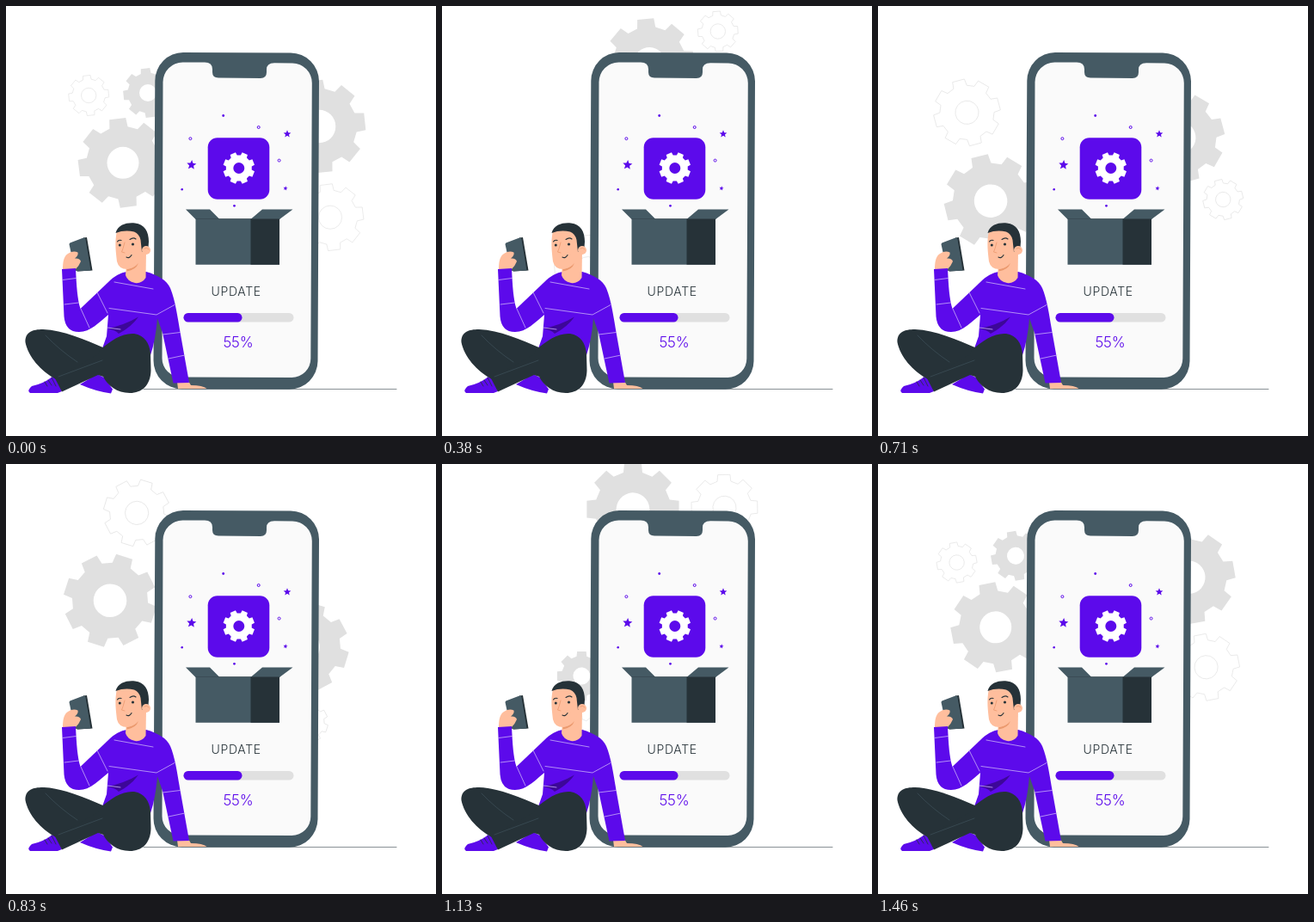
These frames come from a looping animation (500x500 px, 1.5 s). An HTML page:

```html
<!DOCTYPE html>
<html lang="en">
<head>
<meta charset="utf-8">
<title>Update</title>
<style>
  html, body { margin: 0; width: 100%; height: 100%; overflow: hidden; background: #fff; }
  svg { display: block; width: 100vw; height: 100vh; }
  text { font-family: Inter, sans-serif; font-weight: 300; text-anchor: middle; }
  .purple { fill: #5c0aeb; }
  .slate { fill: #455a64; }
  .dark { fill: #263238; }
  .skin { fill: #ffbe9d; }
  .light { fill: #e0e0e0; }
  .line { fill: none; stroke-linecap: round; stroke-linejoin: round; }
</style>
</head>
<body>
<svg viewBox="0 0 500 500">
  <g id="gears"></g>

  <path class="line" d="M160 445.500H454" stroke="#6b757a" stroke-width=".8"/>

  <g id="phone">
    <path class="slate" d="M206 54L331 54.600A33 33 0 0 1 364 87.600L362.500 413A33 33 0 0 1 329.500 445.700L204.500 445.400A33 33 0 0 1 171.500 412L173.300 87A33 33 0 0 1 206 54Z"/>
    <path fill="#fafafa" d="M205.500 65.600H231Q240 65.600 240 73.600V77Q240 83.500 247 83.500L296 84Q303 84 303 77V74Q303 66.300 312 66.300L333 66.500A23 23 0 0 1 355.800 89.500L354.300 410A22 22 0 0 1 332.300 432L203.500 431.500A22 22 0 0 1 181.500 409.500L182.500 88.600A23 23 0 0 1 205.500 65.600Z"/>
  </g>

  <g id="confetti" class="purple">
    <circle cx="252.700" cy="127.500" r="1.400"/>
    <circle cx="204.700" cy="213.300" r="1.300"/>
    <circle cx="265.500" cy="232.300" r="1.400"/>
    <g fill="none" stroke="#5c0aeb">
      <circle cx="293.700" cy="141" r="1.500"/>
      <circle cx="214.400" cy="154.200" r="1.500"/>
      <circle cx="317.600" cy="179.600" r="1.500"/>
    </g>
  </g>

  <rect class="purple" x="234.700" y="153.300" width="71.600" height="71.400" rx="11"/>
  <g id="icon"></g>

  <g id="box">
    <path class="slate" d="M209 236.500H237L248 247.500H285L298 236.500H333.500L318 248V300.700H220.500V248Z"/>
    <path class="dark" d="M284.500 247.500H318V300.700H284.500Z"/>
    <path class="line" d="M221 247.500H318" stroke="#37474f" stroke-width=".7"/>
  </g>

  <text class="dark" x="267.700" y="337.300" font-size="14" letter-spacing=".7">UPDATE</text>
  <rect class="light" x="206.500" y="357" width="128" height="10.400" rx="5.200"/>
  <rect class="purple" x="206.500" y="357" width="68" height="10.400" rx="5.200"/>
  <text class="purple" x="269.900" y="397" font-size="17" letter-spacing="-.2">55%</text>

  <g id="person">
    <!-- hands and device -->
    <path class="skin" d="M199 437L212 436L215 441Q229 441 233.500 445H200Z"/>
    <path class="dark" d="M90 269.500L94 269L100.500 307.500L83 308.500Z"/>
    <path class="slate" d="M73.500 277Q73.500 275.500 75.500 275L90 269.500Q92 269 92.500 271L98.500 307.500L83 308.500Q80 308 79.500 305Z"/>
    <path class="skin" d="M66 307C66 298 67 291 72 288Q78 284 83.500 286.500Q84.500 290 80 293.500Q86 293 87 297Q85 302 81 306Z"/>

    <!-- feet -->
    <path class="purple" d="M54 431L60 434L65 448L60 450H28Q24 447 30 442Q44 439 54 431Z"/>
    <path class="purple" d="M86 440L106 428L114 432L124 445.500L122 450.500Q104 448 86 440Z"/>
    <path class="line" d="M53 432L58 442M49 435L53 441M45 437L48 442" stroke="#263238" stroke-width=".8"/>

    <!-- sweater -->
    <path class="purple" d="M65 306L81 305C82 326 83 341 86.500 352L119 321C126 314 133 310 141 309H163C177 313 187 319 191 328C197 342 200 365 203 382L213 438L194.500 438.500L182 380L176 363Q174 388 168 406L112 398L117 384L119 359C108 368 98 379 85 379Q69 379 67.500 361Z"/>
    <path fill="#3d0799" d="M118 375Q138 371 154 361.500Q146 373 131 381Q128 377 118 375Z"/>
    <path class="line" stroke="#c9b0f8" stroke-width=".8" d="M66 318.500L81.500 316.500M68 347L84.500 345M87 352L97 374M106 333L118 357M126 321L171 329M120 351.500L175 359L196 347.500M182 382L202.500 379.500M189 410L208 406M118 374L133 376"/>

    <!-- legs -->
    <path class="dark" d="M22.500 391C22 379 31 376 43 376C67 377 92 388 115 398L112 414L58 434C40 424 26 408 22.500 391Z"/>
    <path class="dark" d="M109 400C122 389 135 380 149 381C161 383 167 392 168 404L168.500 424C168 441 158 450 144 450C129 450 118 441 113 431L107 429L65 448.500L57 433L107 405Z"/>
    <path class="line" stroke="#3b4d56" stroke-width=".8" d="M61 431L112 412M46 383Q62 400 83 414"/>

    <!-- head -->
    <path class="skin" d="M140 300L163 284L162.500 316Q158 323 150 322Q141 320 139 313Z"/>
    <path fill="#eb996e" d="M140.500 306Q149 305 154 299Q151 307 140.500 308.500Z"/>
    <path class="skin" d="M129 261C126 276 128 287 129 297Q131 306 141 306Q153 304 158 291L163 270L150 256Z"/>
    <path class="dark" d="M127.500 264C130 254 141 251.500 150 252.500C161 254 166 262 166 274Q166 281 164 286H158L156.500 272Q155 265 149 262.500Q138 260 127.500 264Z"/>
    <circle class="skin" cx="163" cy="284" r="5"/>
    <path class="line" stroke="#263238" stroke-width="1.100" d="M129.500 274Q131 271.500 134 272.500M144 271.500Q148 268.500 151 271M140 292Q143.500 294 146 289.500"/>
    <path class="line" stroke="#eb996e" stroke-width=".8" d="M138 275Q136 283 134.500 286L138 287M161 282Q164 280 166 283"/>
    <circle class="dark" cx="132.300" cy="278" r="1.500"/>
    <circle class="dark" cx="147.500" cy="277" r="1.600"/>
  </g>
</svg>

<script>
const NS = "http://www.w3.org/2000/svg";
const $ = id => document.getElementById(id);

function add(parent, tag, attrs) {
  const el = document.createElementNS(NS, tag);
  for (const key in attrs) el.setAttribute(key, attrs[key]);
  parent.appendChild(el);
}

function polar(x, y, r, deg) {
  const a = deg * Math.PI / 180;
  return (x + r * Math.cos(a)).toFixed(2) + " " + (y + r * Math.sin(a)).toFixed(2);
}

// Eight trapezoid teeth around a round hole.
function gearPath(x, y, r, hole, phase) {
  const pts = [];
  for (let k = 0; k < 8; k++) {
    const a = phase + k * 45;
    pts.push(polar(x, y, r * .81, a - 14.5), polar(x, y, r, a - 10.5),
             polar(x, y, r, a + 10.5), polar(x, y, r * .81, a + 14.5));
  }
  return `M${pts.join("L")}ZM${x + hole} ${y}a${hole} ${hole} 0 1 0 ${-2 * hole} 0a${hole} ${hole} 0 1 0 ${2 * hole} 0Z`;
}

function gear(parent, style, ...shape) {
  add(parent, "path", { d: gearPath(...shape), style, "fill-rule": "evenodd" });
}

function star(x, y, r, tilt) {
  const pts = [];
  for (let k = 0; k < 10; k++) pts.push(polar(x, y, k % 2 ? r * .45 : r, tilt - 90 + k * 36));
  add($("confetti"), "path", { d: `M${pts.join("L")}Z` });
}

const solid = "fill:#e0e0e0";
const wire = "fill:none;stroke:#e2e2e2;stroke-width:.7";
const gears = $("gears");
gear(gears, wire, 96.2, 104, 23.6, 8.7, -6);
gear(gears, solid, 165, 101, 29, 10, -6);
gear(gears, solid, 136, 182.3, 52.5, 18.5, -7);
gear(gears, solid, 364, 140, 54.5, 19.3, -6);
gear(gears, wire, 377, 245.7, 39, 13.6, -7);
gear($("icon"), "fill:#fff", 270.8, 188.5, 18.6, 6.5, 22.5);

star(215.7, 184.8, 5.8, 5);
star(327, 148.8, 4.6, 0);
star(325, 212, 2.7, 12);

// The ring turns in whole 4 degree ticks, sampled 24 times a second.
const LOOP = 1500, FRAMES = 36, TICK = 4, TICKS_PER_FRAME = 2.556;

function draw(now) {
  const time = (now + 4) % LOOP;
  const frame = Math.floor(time * FRAMES / LOOP);
  const angle = TICK * Math.floor(frame * TICKS_PER_FRAME);
  gears.setAttribute("transform", `rotate(${angle} 244.5 175.2)`);
}

let start = null;
function loop(now) {
  if (start === null) start = now;
  draw(now - start);
  requestAnimationFrame(loop);
}
draw(0);
requestAnimationFrame(loop);
</script>
</body>
</html>
```
